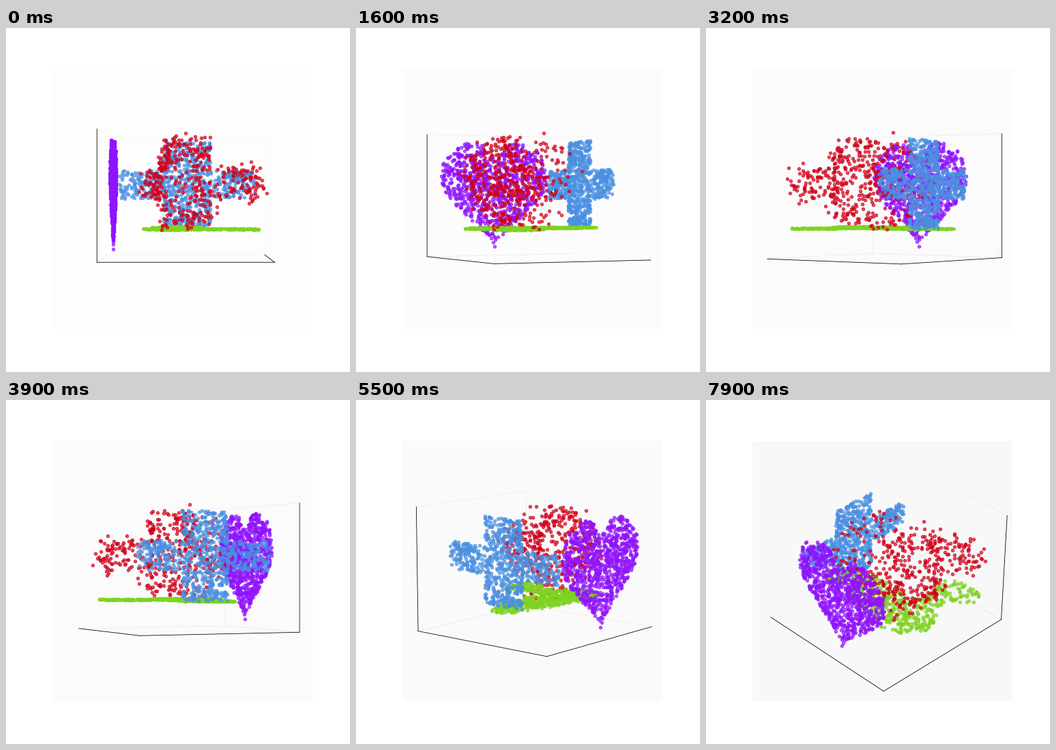
These frames come from a looping animation (504 px wide and 504 px high, 8 s). A matplotlib script:

```python
import numpy as np
import matplotlib.pyplot as plt
from matplotlib.animation import FuncAnimation
from matplotlib.path import Path

FRAMES, STEP_MS = 80, 100
HALF, HALF_Z = 0.5952, 0.4464          # half extents of the view box
WALL_X, WALL_Y, FLOOR_Z = -0.343, -0.513, -0.231
RED, BLUE, PURPLE, GREEN = "#d0021b", "#4a90e2", "#9013fe", "#7ed321"

rng = np.random.default_rng(7)

t = np.linspace(0, 2 * np.pi, 120)
heart_z = 13 * np.cos(t) - 4 * np.cos(2 * t) - 2 * np.cos(3 * t) - np.cos(4 * t)
heart = Path(np.column_stack([0.088 + 0.433 * np.sin(t) ** 3,
                              0.062 + 0.0282 * heart_z]))


def ellipse(x, y, cx, cy, a, b):
    return ((x - cx) / a) ** 2 + ((y - cy) / b) ** 2 < 1


def box(x, y, cx, cy, a, b):
    return (abs(x - cx) < a) & (abs(y - cy) < b)


def in_heart(p):
    return heart.contains_points(p)


def in_cross(p):
    y, z = p.T
    return box(y, z, .007, .081, .172, .311) | box(y, z, .007, .083, .508, .103)


def in_fish(p):
    x, y = p.T
    body = ellipse(x, y, -.05, -.07, .48, .18) | ellipse(x, y, .27, -.08, .24, .22)
    tail = box(x, y, .29, .2, .08, .15) | ellipse(x, y, .33, .4, .19, .12)
    return body | tail


def in_hull(p):
    return in_heart(p[:, [0, 2]]) & in_cross(p[:, 1:]) & in_fish(p[:, :2])


def sample(inside, n, dims=2):
    p = rng.uniform(-.56, .56, (n * 40, dims))
    return p[inside(p)][:n]


def shell(n, depth=0.045, noise=0.026):
    """Noisy points near the surface of the solid, denser towards +x."""
    p = sample(in_hull, 8000, 3)
    core = np.ones(len(p), bool)
    for step in np.vstack([np.eye(3), -np.eye(3)]) * depth:
        core &= in_hull(p + step)
    keep = ~core & (rng.random(len(p)) < .5 + p[:, 0])
    p = p[keep][:n]
    return p + rng.normal(0, noise, p.shape)


fig = plt.figure(figsize=(7, 7), dpi=72, facecolor="white")
fig.subplots_adjust(left=.125, right=.9, bottom=.125, top=.88)
ax = fig.add_subplot(projection="3d")
ax.set_xlim(-HALF, HALF)
ax.set_ylim(-HALF, HALF)
ax.set_zlim(-HALF_Z, HALF_Z)
ax.grid(False)
for axis in (ax.xaxis, ax.yaxis, ax.zaxis):
    axis.set_ticks([])
    axis.pane.fill = False


def dots(x, y, z, color):
    x, y, z = np.broadcast_arrays(x, y, z)
    ax.scatter(x, y, z, s=20, c=color, alpha=0.7, depthshade=False)


dots(*shell(450).T, RED)

y, z = sample(in_cross, 760).T
dots(WALL_X, y, z, BLUE)

x, z = sample(in_heart, 880).T
dots(x, WALL_Y, z, PURPLE)

x, y = sample(in_fish, 560).T
dots(x, y, FLOOR_Z, GREEN)


def draw(i):
    # the tiny offset keeps the back panes well defined in edge-on views
    ax.view_init(elev=max(0, i - 45) + .01, azim=4 * i + .01)
    ax.set_facecolor([(253 - 5 * i / (FRAMES - 1)) / 255] * 3)
    return []


anim = FuncAnimation(fig, draw, frames=FRAMES, interval=STEP_MS,
                     repeat=True, repeat_delay=0)
plt.show()
```
